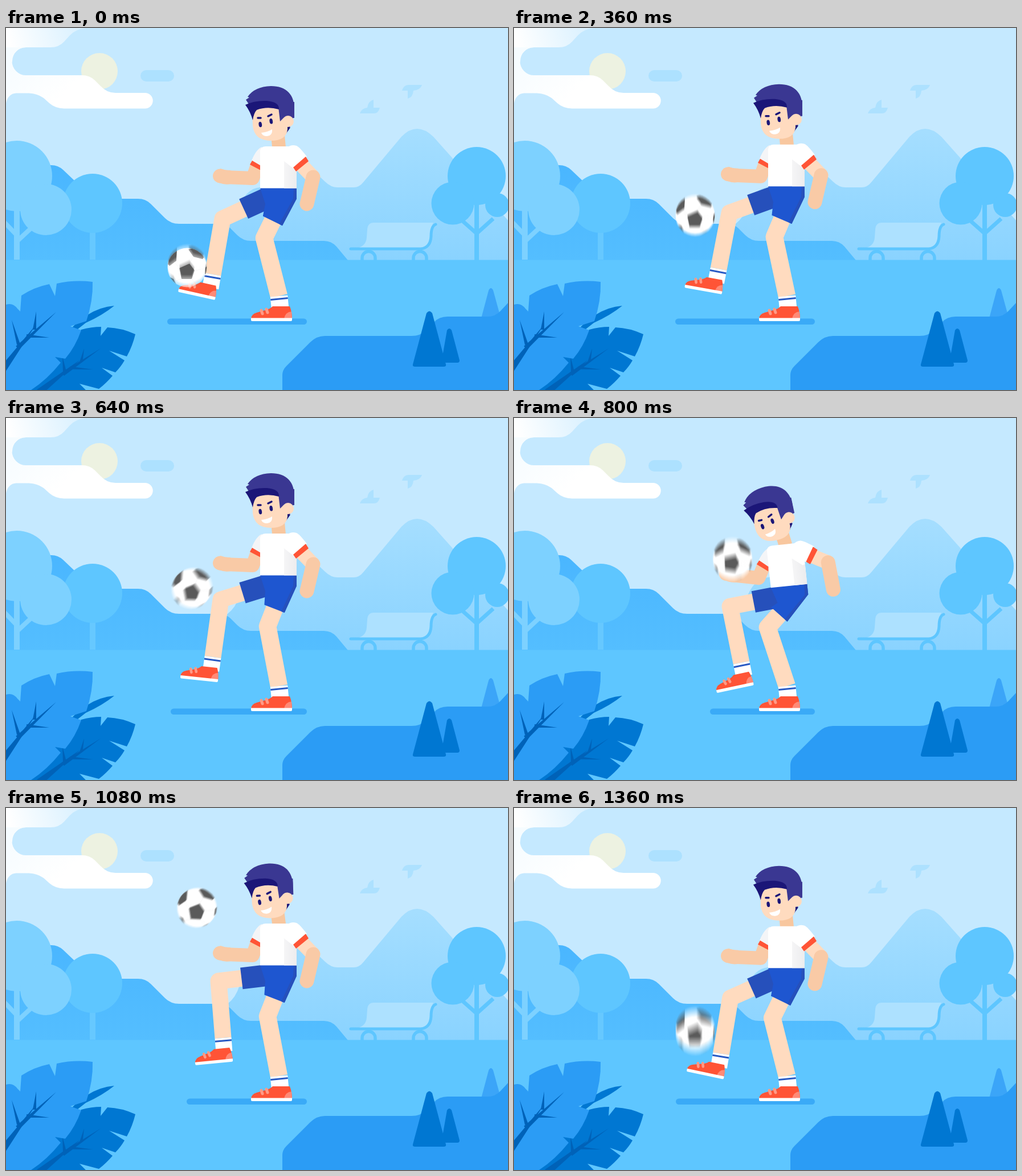
Recreate the animation shown at these times as an HTML page with a canvas. Size 881 by 636 pixels, loop 1400 ms.

```html
<!DOCTYPE html>
<html lang="en">
<head>
<meta charset="utf-8">
<title>Juggling a ball in the park</title>
<style>
  html, body { margin: 0; width: 100%; height: 100%; overflow: hidden; background: #c5e9ff; }
  canvas { display: block; }
</style>
</head>
<body>
<canvas id="stage" width="881" height="636"></canvas>
<script>
const W = 881, H = 636, LOOP = 1400, STEP = 40;
const RAD = Math.PI / 180;
const SKIN = '#ffdbbf', SKIN_DARK = '#f9caa6', HAIR = '#3a3792', INK = '#1b1678';
const RED = '#ff5436', SHORTS = '#1e56d0', SHORTS_DARK = '#2650bb';
const SKY = '#c5e9ff', PALE = '#ade1ff', GROUND = '#5ec6ff', LEAF = '#2b9cf5', DEEP = '#0077d2', VEIN = '#0062b8';

const makeCanvas = (w, h) => Object.assign(document.createElement('canvas'), { width: w, height: h });
const stage = document.getElementById('stage').getContext('2d');

function fill(c, color, d) {
  c.fillStyle = color;
  c.fill(new Path2D(d));
}
function stroke(c, color, width, d, cap = 'round') {
  c.strokeStyle = color;
  c.lineWidth = width;
  c.lineCap = cap;
  c.lineJoin = 'round';
  c.stroke(new Path2D(d));
}
function disc(c, color, x, y, r, ry = r, tilt = 0) {
  c.fillStyle = color;
  c.beginPath();
  c.ellipse(x, y, r, ry, tilt, 0, 7);
  c.fill();
}
function pill(c, color, x, y, w, h) {
  c.fillStyle = color;
  c.beginPath();
  c.roundRect(x, y, w, h, h / 2);
  c.fill();
}
function fade(c, x0, y0, x1, y1, from, to) {
  const g = c.createLinearGradient(x0, y0, x1, y1);
  g.addColorStop(0, from);
  g.addColorStop(1, to);
  return g;
}
function spin(c, x, y, deg, draw) {
  c.save();
  c.translate(x, y);
  c.rotate(deg * RAD);
  c.translate(-x, -y);
  draw();
  c.restore();
}

// ---------- scenery ----------
function paintSky(c) {
  c.fillStyle = SKY;
  c.fillRect(0, 0, W, H);
  disc(c, '#edf2e1', 164, 76, 32);
  fill(c, fade(c, 10, 40, 135, 0, '#ffffff', '#d8f0ff'),
    'M0 0H140Q122 2 112 13L102 24Q93 34 78 34H35A24 24 0 0 0 11 58L0 90Z');
  fill(c, fade(c, 0, 60, 80, 140, '#f6fcff', '#ffffff'),
    'M0 34H35A24.5 24.5 0 0 0 35 83H133Q147 83 156 92L166 102Q177 114 192 114H244A13.7 13.7 0 0 1 244 141.5H102Q86 141 76 132L66 123Q55 115 40 114.5H18Q4 115 0 132Z');
  pill(c, PALE, 236, 74, 59, 20);
  fill(c, PALE, 'M621 150Q624 141 634 140Q636 128 645 126V140H656Q654 150 645 150Z');
  fill(c, PALE, 'M695 110Q698 100 706 100H730Q727 109 715 110Q714 122 705 124V110Z');
}

function paintHills(c) {
  fill(c, fade(c, 0, 180, 0, 408, '#a5deff', '#8ad3ff'),
    'M380 408V350Q398 340 406 322Q420 281 446 280Q470 276 488 252Q514 228 544 255L560 270Q570 280 582 280H610Q620 280 627 271L694 191Q721 163 750 191L881 338V408Z');
  fill(c, fade(c, 0, 240, 0, 408, '#4ab6ff', '#54beff'),
    'M0 241H80Q91 241 100 249L120 268L160 300H232Q245 300 254 309L279 334Q289 344 304 344H372Q385 344 394 352L406 364Q416 374 430 374H558Q571 374 580 384L600 408H0Z');
  c.fillStyle = GROUND;
  c.fillRect(0, 407.5, W, H);
}

function paintTrees(c) {
  stroke(c, '#66c8ff', 10, 'M152 340V407', 'butt');
  disc(c, GROUND, 152, 308, 52);

  const light = '#7dd1ff';
  stroke(c, light, 10, 'M19 310V407', 'butt');
  stroke(c, light, 8, 'M-6 338L19 364M19 375L48 348');
  disc(c, light, 19, 260, 62);
  disc(c, light, 70, 319, 45);

  stroke(c, GROUND, 8, 'M826 290V408', 'butt');
  stroke(c, GROUND, 7, 'M799 337L826 361L855 335', 'butt');
  disc(c, GROUND, 826, 260, 51);
  disc(c, GROUND, 784, 308, 37.5);
  disc(c, GROUND, 862, 311, 21);
}

function paintBench(c) {
  fill(c, PALE, 'M645 342H750Q746 349 747 359Q748 380 731 387H616Q632 383 633 368L634 354Q635 342 645 342Z');
  stroke(c, GROUND, 5, 'M605 388H728Q745 386 746 366Q746 348 754 345');
  stroke(c, GROUND, 5.5, 'M625 408V404A11.5 11.5 0 0 1 648 404V408M715 408V404A11.5 11.5 0 0 1 738 404V408', 'butt');
}

// A leaf vein: wide at the root, pointed at the tip.
function vein(c, x0, y0, x1, y1, width) {
  const len = Math.hypot(x1 - x0, y1 - y0);
  const nx = (y0 - y1) / len * width / 2, ny = (x1 - x0) / len * width / 2;
  fill(c, VEIN, line([x0 + nx, y0 + ny], [x1, y1], [x0 - nx, y0 - ny]) + 'Z');
}

function paintForeground(c) {
  fill(c, '#3ba5f8', 'M834 510L847 461Q851 453 855 461L869 512Z');
  fill(c, LEAF, 'M485 636V610Q485 601 492 594L534 552Q545 541 560 541H712Q727 541 736 532L751 517Q760 507 775 507H845Q859 507 868 497L881 483V636Z');
  fill(c, DEEP, 'M714 591L738 501Q743 494 748 501L772 591Q773 595 768 595H718Q713 595 714 591Z');
  fill(c, DEEP, 'M764 588L774 531Q778 525 782 531L796 584Q796 588 792 588Z');

  fill(c, DEEP, 'M100 545Q140 492 190 488Q169 505 140 518L112 540Z');
  fill(c, DEEP, 'M38 636Q85 570 132 530Q150 525 167 525L166 541L178 526Q203 527 227 538Q222 559 212 577L181 567L208 584Q201 596 192 605L168 597L187 611Q176 624 163 634L129 625L140 636Z');
  vein(c, 58, 640, 130, 583, 12);
  vein(c, 100, 608, 166, 563, 7);
  vein(c, 103, 604, 99, 577, 6);
  vein(c, 132, 586, 137, 563, 5);
  vein(c, 112, 597, 153, 600, 5);

  fill(c, LEAF, 'M0 486Q12 482 20 493L25 498L27 470Q50 455 76 450L86 471L89 449Q120 442 152 446Q153 480 141 515L113 524L132 531Q122 560 104 581L86 578L96 588Q72 618 44 636H0Z');
  vein(c, -10, 606, 52, 522, 13);
  vein(c, 20, 562, 88, 499, 8);
  vein(c, 22, 556, 10, 513, 6);
  vein(c, 50, 530, 53, 498, 6);
  vein(c, 36, 541, 76, 544, 6);
}

// ---------- motion ----------
// hip x, y, lean, head, far arm, near arm, standing knee x, y, kicking knee x, y, ankle x, y, shoe, shadow
const low = [478, 281, 0, 0, 0, 0, 453, 369, 380, 335, 363, 433, 12.5, 283];
const high = [478, 276, 0, 0, 0, 0, 459, 366, 377, 319, 357, 418, 9, 283];
const shift = [478, 276, 0, 0, 0, 0, 459, 366, 377, 319, 363, 420, 6, 289];
const crouch = [482.5, 294.5, -6, -6, 10, -18, 445, 368, 379, 331, 399, 430, -12, 344];
const lift = [478, 276, 0, -2, 0, 0, 459, 366, 373, 304, 381, 404, -5.5, 317];
const keys = [[0, low], [200, high], [280, high], [480, low], [600, high],
  [640, shift], [800, crouch], [1080, lift], [1400, low]];

function slope(k, i) {
  if (k === 0 || k === keys.length - 1) return 0;
  const rate = n => (keys[n + 1][1][i] - keys[n][1][i]) / (keys[n + 1][0] - keys[n][0]);
  const a = rate(k - 1), b = rate(k);
  return a * b <= 0 ? 0 : 2 * a * b / (a + b);
}
function poseAt(t) {
  let k = 0;
  while (k < keys.length - 2 && t >= keys[k + 1][0]) k++;
  const [t0, a] = keys[k], [t1, b] = keys[k + 1];
  const d = t1 - t0, u = (t - t0) / d, s = u * u * (3 - 2 * u);
  return a.map((v, i) => v + (b[i] - v) * s
    + d * u * (1 - u) * ((1 - u) * slope(k, i) - u * slope(k + 1, i)));
}

function smooth(t, a, b) {
  const u = Math.min(1, Math.max(0, (t - a) / (b - a)));
  return u * u * (3 - 2 * u);
}
function ballAt(time) {
  const t = (time + LOOP) % LOOP;
  const arc = (y, v, g, s) => y - v * s + g * s * s;
  const y = t < 483 ? arc(421, 1.012, 0.0021, t)
    : t < 762 ? arc(421, 1.136, 0.002285, t - 483)
    : arc(248, 0.777, 0.001845, t - 800);
  return { x: 318 + 66 * (smooth(t, 600, 780) - smooth(t, 780, 1230)), y: Math.min(421, y) };
}

// ---------- player ----------
function line(...points) {
  return 'M' + points.map(p => p[0] + ' ' + p[1]).join('L');
}
function toward(a, b, dist) {
  const len = Math.hypot(b[0] - a[0], b[1] - a[1]);
  return [a[0] + (b[0] - a[0]) * dist / len, a[1] + (b[1] - a[1]) * dist / len];
}

function shoe(c) {
  fill(c, RED, 'M0 -4Q0 -12 10 -15L24 -19Q33 -21 38 -26H68Q72 -16 72 -4Z');
  fill(c, '#ff8a76', 'M58 -4Q60 -16 71 -17L72 -4Z');
  stroke(c, '#ff9a86', 5, 'M18 -19L20 -13M27 -21L29 -15');
  fill(c, '#fff', 'M0 -5.5H72V-2Q72 0 70 0H2Q0 0 0 -2Z');
}
function sock(c, ankle, above, width) {
  const down = dist => toward(ankle, above, -dist);
  const mid = down(5), half = toward(ankle, above, width / 2);
  const dx = ankle[1] - half[1], dy = half[0] - ankle[0];
  stroke(c, '#fff', width, line(ankle, down(24)), 'butt');
  stroke(c, '#2a5bc4', 3, line([mid[0] - dx, mid[1] - dy], [mid[0] + dx, mid[1] + dy]), 'butt');
}

function farArm(c) {
  stroke(c, SKIN_DARK, 24, 'M384 262L433 264L440 244', 'butt');
  disc(c, SKIN_DARK, 376, 260, 13, 12.5);
  fill(c, SKIN_DARK, 'M374 272Q384 276 394 274V250Q384 250 376 247Z');
  fill(c, '#f4f5f7', 'M449 209Q439 213 431 233L449 245Z');
  fill(c, RED, 'M432 233L449 243V251L428 240Z');
}
function nearArm(c) {
  stroke(c, SKIN, 25, 'M512 234L538 261', 'butt');
  stroke(c, SKIN_DARK, 25, 'M539 262L528 309');
  fill(c, '#fff', 'M486 222Q494 202 510 207Q515 209 528 226L506 247L489 234Z');
  fill(c, RED, 'M526 226L531 234L509 252L504 245Z');
}
function head(c) {
  fill(c, '#f8c79f', 'M465 188H489L491 209H467Z');
  fill(c, HAIR, 'M476 130H506Q507 164 492 185Z');
  fill(c, INK, 'M493 172L499 175Q495 181 491 185Z');
  fill(c, SKIN, 'M432 138H494V178Q492 198 465 198Q436 198 433 172Z');
  fill(c, HAIR, 'M421 126L427 122L424 121Q436 103 465 102C492 102 507 117 506 145L506 158H487L481 164L478 139L430 140Z');
  fill(c, INK, 'M420 135Q436 127 458 128Q480 130 479 143Q458 137 440 144Q435 149 433 162Q429 147 420 135Z');
  disc(c, SKIN, 495, 164, 10);
  disc(c, INK, 446.3, 169.5, 2.8, 4.8, -0.15);
  disc(c, INK, 465.3, 163.8, 2.8, 4.8, -0.15);
  stroke(c, INK, 3.5, 'M442 158L447 158M460 155L466 152');
  fill(c, '#fff', 'M448 184Q459 183 467 178Q468 189 458 190Q450 190 448 184Z');
}

function drawPlayer(c, pose) {
  const [x, y, lean, nod, swingFar, swingNear, k2x, k2y, k1x, k1y, ax, ay, tilt, shadow] = pose;
  const cos = Math.cos(lean * RAD), sin = Math.sin(lean * RAD);
  const onHip = (dx, dy) => [x + dx * cos - dy * sin, y + dx * sin + dy * cos];
  const upper = draw => {
    c.save();
    c.translate(x, y);
    c.rotate(lean * RAD);
    c.translate(-478, -281);
    draw();
    c.restore();
  };

  pill(c, '#3aaaf7', shadow, 510.5, 528 - shadow, 10.5);
  upper(() => spin(c, 440, 225, swingFar, () => farArm(c)));

  const kickHip = onHip(-20, 18), kickKnee = [k1x, k1y], ankle = [ax, ay];
  stroke(c, SKIN, 29, line(kickHip, kickKnee, ankle), 'butt');
  sock(c, ankle, kickKnee, 29);
  c.save();
  c.translate(ax, ay);
  c.rotate(tilt * RAD);
  c.translate(-53, 43);
  c.scale(0.92, 0.96);
  shoe(c);
  c.restore();

  const hip = onHip(8, 21), knee = [k2x, k2y], planted = [479, 471];
  stroke(c, SKIN, 30.5, line(toward(hip, knee, 30), knee, planted), 'butt');
  sock(c, planted, [475, 430], 30.5);
  c.save();
  c.translate(430, 515);
  shoe(c);
  c.restore();

  stroke(c, SHORTS_DARK, 38, line(toward(kickHip, kickKnee, -8), toward(kickHip, kickKnee, 45)), 'butt');
  const hem = toward(hip, knee, 41), across = toward(hip, knee, 19);
  const nx = hip[1] - across[1], ny = across[0] - hip[0];
  const hemL = [hem[0] + nx, hem[1] + ny], hemR = [hem[0] - nx, hem[1] - ny];
  const waistR = onHip(32, 0), side = onHip(32, 19);
  fill(c, SHORTS, line(onHip(-32, 0), waistR, side, hemR, hemL, onHip(-23, 28)) + 'Z');
  fill(c, SHORTS_DARK, line(onHip(27, 0), waistR, side, hemR, toward(hemR, hemL, 6), onHip(26, 19)) + 'Z');

  upper(() => {
    spin(c, 478, 205, nod, () => head(c));
    fill(c, '#fff', 'M446 281.5V216Q447 208 456 208H502Q510 210 510 220V281.5Z');
    fill(c, fade(c, 486, 0, 511, 0, '#f6f6f7', '#ececee'), 'M488 234L506 248L510 246V281.5H488Z');
    spin(c, 500, 218, swingNear, () => nearArm(c));
  });
}

// ---------- ball ----------
const BOX = 120, MID = BOX / 2;
const sprite = makeCanvas(BOX, BOX);
(c => {
  c.translate(MID, MID);
  c.beginPath();
  c.arc(0, 0, 34.5, 0, 7);
  c.clip();
  c.fillStyle = '#fff';
  c.fillRect(-MID, -MID, BOX, BOX);
  const dark = '#505050';
  fill(c, dark, 'M-14 1L4 -7L13 5L8 20L-10 20Z');
  fill(c, dark, 'M2 -32L18 -36L32 -21L27 -15L11 -19Z');
  fill(c, dark, 'M-18 -30L-19 -12L-31 -3L-40 -12Z');
  fill(c, dark, 'M-36 14L-24 20L-18 32L-28 38Z');
  fill(c, dark, 'M40 -8L32 0L31 11L38 18Z');
  fill(c, dark, 'M10 33L21 27L28 24L22 40Z');
  stroke(c, '#e6e6e6', 1, 'M4 -7L11 -19M13 5L31 2M8 20L16 30M-10 20L-22 24M-14 1L-22 -9');
})(sprite.getContext('2d'));

const smear = makeCanvas(BOX, BOX);
const smearCtx = smear.getContext('2d');

function drawBall(c, t) {
  const SAMPLES = 15, SHUTTER = 16, ball = ballAt(t);
  smearCtx.globalCompositeOperation = 'copy';
  smearCtx.globalAlpha = 1 / SAMPLES;
  for (let i = 0; i < SAMPLES; i++) {
    const p = ballAt(t + SHUTTER * ((i + 0.5) / SAMPLES - 0.5));
    smearCtx.setTransform(1, 0, 0, 1, MID + p.x - ball.x, MID + p.y - ball.y);
    smearCtx.rotate((p.x - 318) * 0.15 * RAD);
    smearCtx.drawImage(sprite, -MID, -MID);
    smearCtx.globalCompositeOperation = 'lighter';
  }
  c.drawImage(smear, ball.x - MID, ball.y - MID);
}

// ---------- loop ----------
const scenery = makeCanvas(W, H);
[paintSky, paintHills, paintTrees, paintBench, paintForeground]
  .forEach(paint => paint(scenery.getContext('2d')));

const start = performance.now();
function frame() {
  const elapsed = (performance.now() - start) % LOOP;
  const t = Math.floor(elapsed / STEP) * STEP;
  stage.drawImage(scenery, 0, 0);
  drawPlayer(stage, poseAt(t));
  drawBall(stage, t);
  requestAnimationFrame(frame);
}
frame();
</script>
</body>
</html>
```
